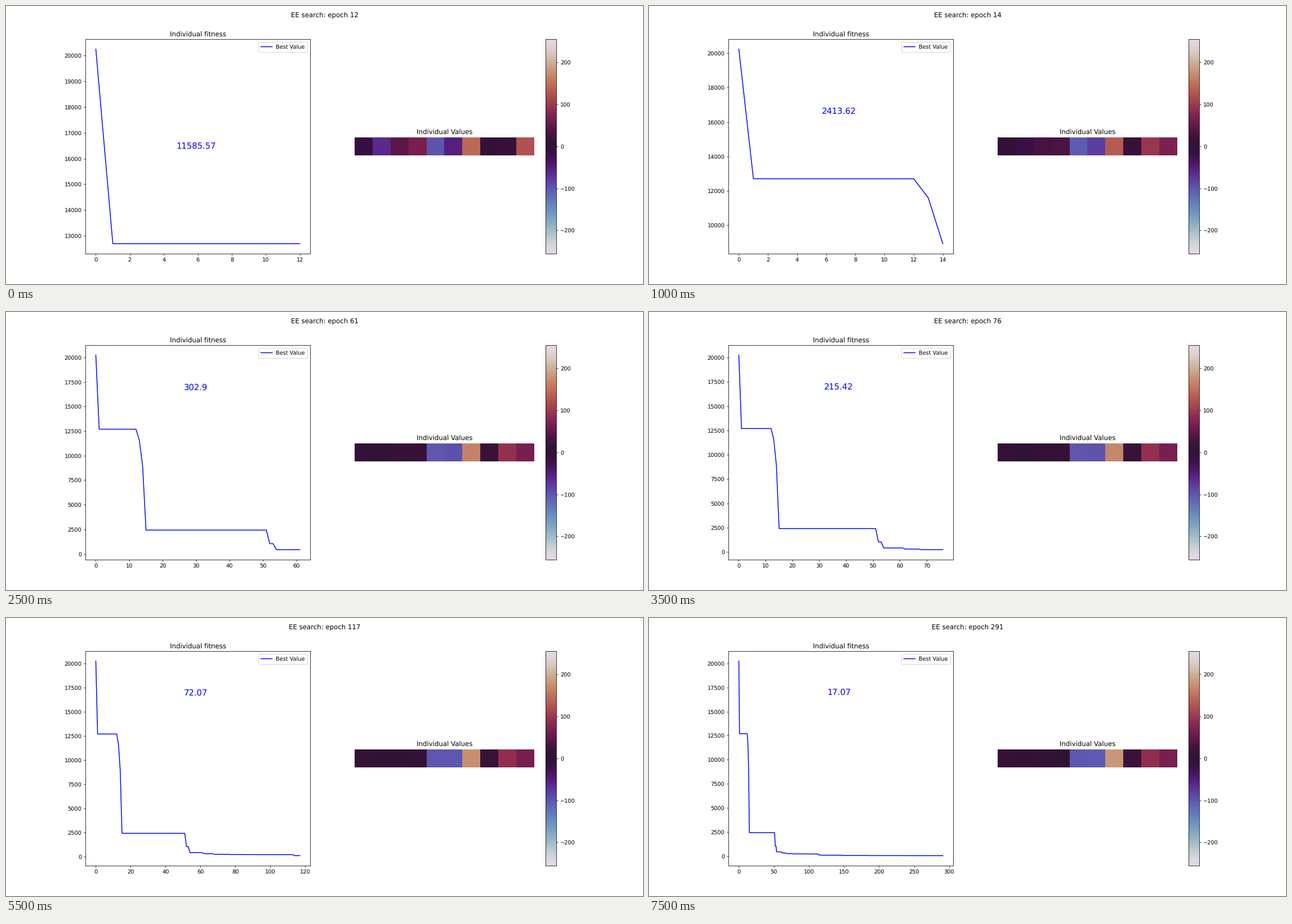
A matplotlib script that plays this animation: 1131x495 px, repeating every 8 s.

```python
import numpy as np
import matplotlib.pyplot as plt
from matplotlib.animation import FuncAnimation

FRAMES = 16
FIRST = 2  # index of the first improvement on show

plt.rcParams["text.hinting"] = "none"

# Epochs at which the search improved, and the best value from then on.
EPOCHS = np.r_[0, 1, 13, 14, 15, 52, 54, 62, 68,
               np.geomspace(77, 93, 3), 114,
               np.geomspace(118, 292, 5)].round().astype(int)
BEST = np.r_[20245.31, 12696.48, 11585.57, 8916.34, 2413.62, 1034.42,
             418.73, 302.9, 241.38,
             np.geomspace(215.42, 203.17, 3), 97.46,
             np.geomspace(72.07, 17.07, 5)].round(2)

# The genes close in on the last pose as the error shrinks.
POSES = np.array([
    [10, 7, 5, 3, -100, -103, 180, 16, 88, 66],
    [3, -40, 52, 65, -108, -56, 84, 10, 106, 75],
    [-14, -62, 45, 67, -97, -52, 143, 3, 12, 124],
])
POSE_ERRORS = np.sqrt(BEST[[-1, FIRST + 1, FIRST]])


def history(epoch):
    epochs = np.arange(epoch + 1)
    return epochs, BEST[np.searchsorted(EPOCHS, epochs, side="right") - 1]


def genes(best):
    return [[np.interp(np.sqrt(best), POSE_ERRORS, gene) for gene in POSES.T]]


# 1131 x 495 pixels
fig, (ax_fit, ax_ind) = plt.subplots(1, 2, figsize=(16, 7.003), dpi=1131 / 16)
title = fig.suptitle("")

image = ax_ind.imshow(genes(BEST[FIRST]), cmap="twilight", vmin=-255, vmax=255)
ax_ind.set_title("Individual Values")
ax_ind.axis("off")
fig.colorbar(image, ax=ax_ind)


def update(step):
    epoch = EPOCHS[step + FIRST] - 1
    best = BEST[step + FIRST]
    title.set_text(f"EE search: epoch {epoch}")

    ax_fit.clear()
    ax_fit.set_title("Individual fitness")
    ax_fit.plot(*history(epoch), color="blue", label="Best Value")
    ax_fit.annotate(str(best), (epoch / 2, 0.8 * BEST[0]), xytext=(-3.5, 9),
                    textcoords="offset points", ha="center",
                    fontsize=15, color="blue")
    ax_fit.legend(loc="upper right")

    image.set_data(genes(best))
    return []


anim = FuncAnimation(fig, update, frames=FRAMES, init_func=lambda: [],
                     interval=500, repeat=True, repeat_delay=0)
plt.show()
```
